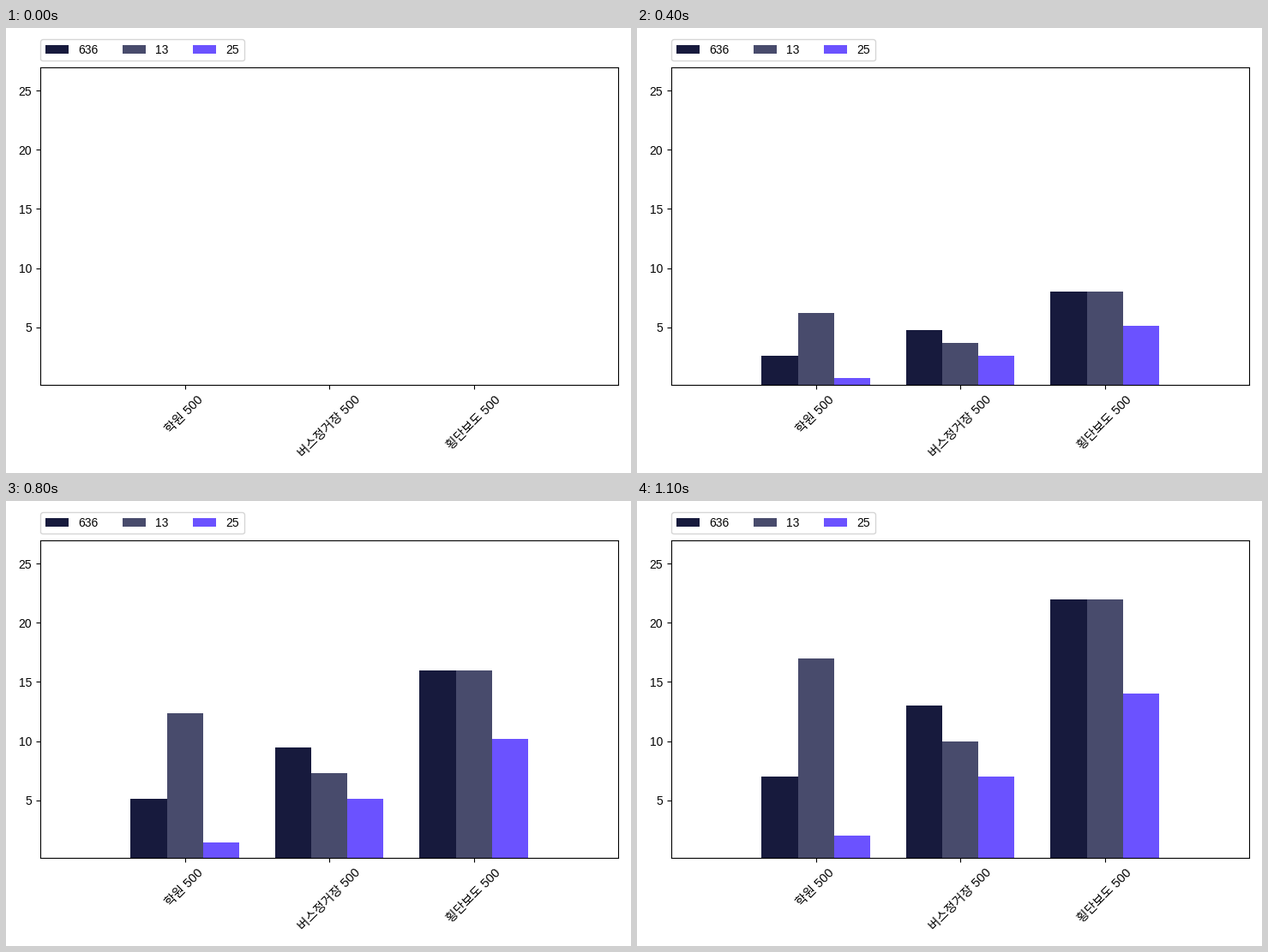
A matplotlib script that plays this animation: 729x520 px, repeating every 1.9 s.

```python
import numpy as np
import matplotlib.pyplot as plt
from matplotlib.animation import FuncAnimation

# Latin digits first, Hangul through the fallback font
plt.rcParams["font.family"] = ["Liberation Sans", "Noto Sans CJK JP"]
plt.rcParams["font.size"] = 10

W, H = 729, 520
FRAMES, GROW = 19, 11
BAR = 0.25

places = ["학원 500", "버스정거장 500", "횡단보도 500"]
series = {
    "636": ("#171a3d", [7, 13, 22]),
    "13": ("#484b6c", [17, 10, 22]),
    "25": ("#6b52ff", [2, 7, 14]),
}

fig = plt.figure(figsize=(W / 100, H / 100), dpi=100, facecolor="white")
ax = fig.add_axes([40.08 / W, 102.76 / H, 674 / W, 371.5 / H])

x = np.arange(len(places))
bars = []
for i, (name, (color, values)) in enumerate(series.items()):
    group = ax.bar(x + (i - 1) * BAR, np.zeros(len(x)), BAR, color=color, label=name)
    bars += zip(group, values)

ax.set_xlim(-1, 3)
ax.set_ylim(0.1, 27)
ax.set_yticks(range(5, 26, 5))
ax.set_xticks(x, places, rotation=45, fontsize=10.5)
ax.legend(loc="lower left", bbox_to_anchor=(0, 1.02), ncol=3, borderaxespad=0)


def update(frame):
    """Grow every bar linearly, then hold."""
    progress = min(frame / GROW, 1)
    for bar, value in bars:
        bar.set_height(value * progress)
    return [bar for bar, _ in bars]


anim = FuncAnimation(fig, update, frames=FRAMES, interval=100, repeat=True, repeat_delay=0)
plt.show()
```
